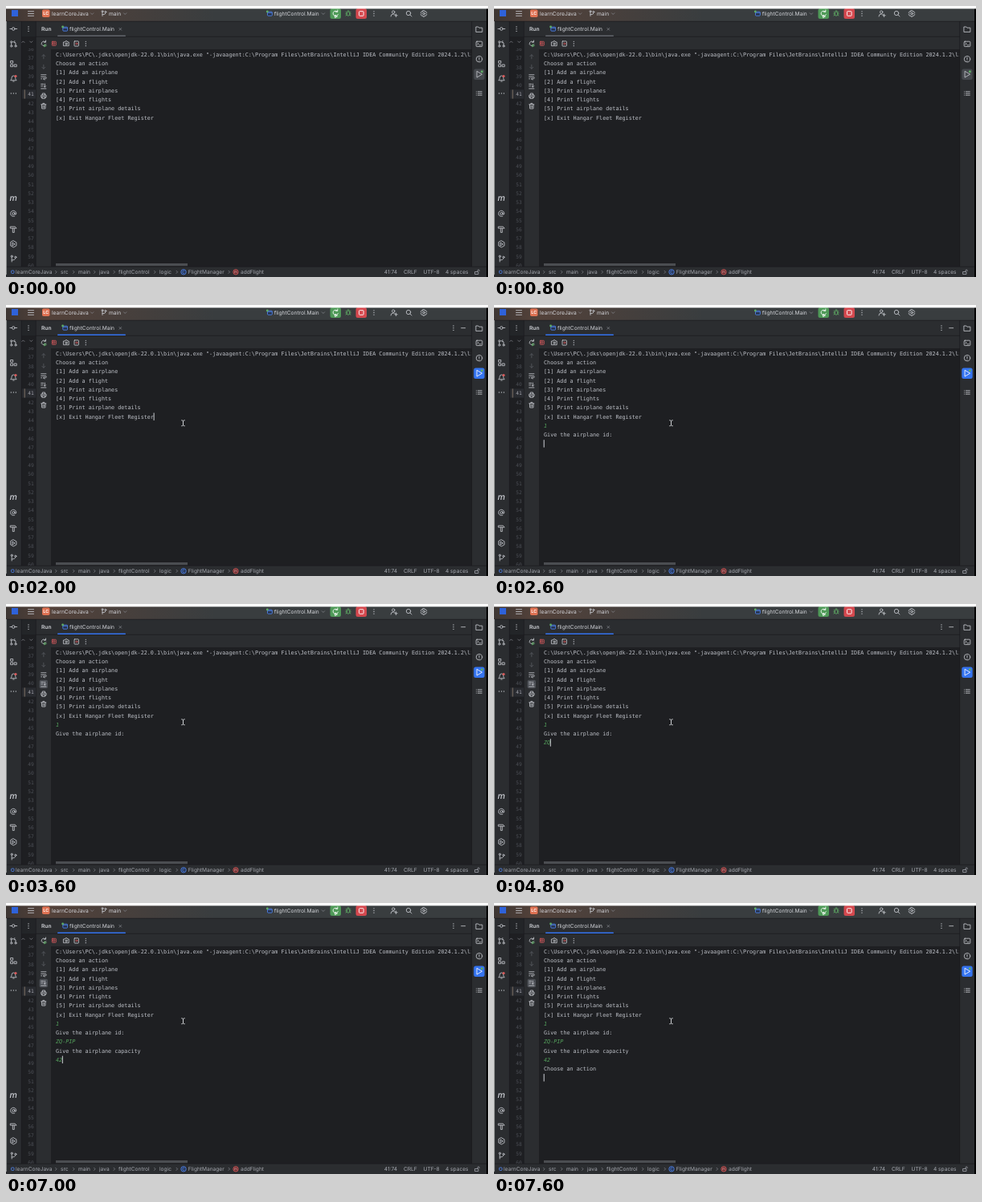
Write an HTML page that moves like this. It is 600 by 338 pixels and loops after 8 s.

```html
<!DOCTYPE html>
<html lang="en">
<head>
<meta charset="utf-8">
<title>Run console</title>
<style>
  html, body { margin: 0; width: 100%; height: 100%; overflow: hidden; background: #1e1f22; }
  svg { display: block; width: 100vw; height: 100vh; text-rendering: geometricPrecision; }
  text { white-space: pre; }
  .ui { font: 6.65px Inter, sans-serif; fill: #d3d5da; }
  .status { font-size: 6.6px; fill: #a6a9b0; }
  .mono { font: 6.75px "DejaVu Sans Mono", monospace; fill: #bec1c8; }
  .input { fill: #55a35d; font-style: italic; }
  .gutter { font-size: 6.2px; fill: #4c4f56; text-anchor: end; }
  .icon { fill: none; stroke: #c3c6cc; stroke-width: .85; stroke-linecap: round; stroke-linejoin: round; }
  .dim { stroke: #55585e; }
  .red { stroke: #d0585c; }
  .green { stroke: #5fad65; }
  .dots { stroke-width: 1.3; }
  .chevron { stroke: #8a8d94; stroke-width: .7; }
</style>
</head>
<body>
<svg viewBox="0 0 600 338" preserveAspectRatio="none">
  <defs>
    <linearGradient id="warm">
      <stop offset="0" stop-color="#3d3633"/><stop offset=".2" stop-color="#54423a"/>
      <stop offset="1" stop-color="#393d3f"/>
    </linearGradient>
    <clipPath id="view"><rect x="56" y="54" width="523" height="270"/></clipPath>
    <clipPath id="numbers"><rect x="19" y="53" width="18" height="272"/></clipPath>
  </defs>

  <!-- Panels -->
  <rect width="600" height="338" fill="#2b2d30"/>
  <rect width="600" height="19" fill="#393d3f"/>
  <rect width="260" height="19" fill="url(#warm)"/>
  <rect x="19" y="19" width="18" height="306" fill="#1e1f22"/>
  <rect x="56" y="54" width="524" height="271" fill="#1e1f22"/>
  <rect x="19" y="19" width="18" height="19" fill="#232528"/>
  <path d="M0 19.2H598M19.3 19V325M579.7 19V325M0 325.2H598M37.3 19V325M37 38.3H580" stroke="#1a1b1e" stroke-width=".7"/>
  <rect x="20" y="104.4" width="17" height="11.2" fill="#292b30"/>
  <rect x="22.6" y="104.4" width="1.3" height="11.2" fill="#6a6159"/>
  <g id="gutter" clip-path="url(#numbers)"></g>

  <!-- Header -->
  <rect x="7" y="5" width="8" height="8" fill="#2f62d9"/>
  <path class="icon" d="M27.5 6.7h7M27.5 9.5h7M27.5 12.3h7"/>
  <rect x="45" y="4.5" width="9.5" height="9.5" rx="1.8" fill="#df7152"/>
  <text x="49.8" y="11.4" text-anchor="middle" style="font:600 5.5px Inter,sans-serif;fill:#fff">LC</text>
  <g class="ui">
    <text x="57" y="11.8">learnCoreJava</text>
    <text x="128" y="11.8">main</text>
    <text x="333.8" y="11.8">flightControl.Main</text>
    <text x="44" y="31" font-weight="600">Run</text>
    <text x="79" y="31">flightControl.Main</text>
  </g>
  <path class="icon chevron" d="M105.5 8.8l1.7 1.7 1.7-1.7M146.5 8.8l1.7 1.7 1.7-1.7M393.2 8.8l1.7 1.7 1.7-1.7"/>
  <path class="icon" d="M120 7.5v5M120 10.5h2.2q1.6 0 1.6-2"/>
  <g class="icon"><circle cx="120" cy="6.7" r="1"/><circle cx="123.8" cy="7.4" r="1"/></g>
  <g id="config">
    <rect x="325.5" y="7.2" width="5.8" height="5" rx=".9" fill="#25324d" stroke="#548af7" stroke-width=".8"/>
    <path d="M325.5 8.6h5.8" stroke="#548af7" stroke-width=".7"/>
    <circle cx="325.3" cy="7" r="1.4" fill="#5fad65"/>
  </g>
  <use href="#config" x="-254.7" y="19"/>
  <rect x="403.5" y="3" width="13.5" height="13" rx="2.5" fill="#4f9a58"/>
  <path class="icon" style="stroke:#fff" d="M412.5 7a3.2 3.2 0 1 0 .8 3.6M412.8 5v2.3h-2.3M410 11.5l2.5 1.5-2.5 1.5z"/>
  <g class="icon green">
    <rect x="424.3" y="7" width="3.4" height="5.2" rx="1.7"/>
    <path d="M423 7.6l1.3.9M422.8 9.8h1.5M423 12l1.3-.9M429 7.6l-1.3.9M429.2 9.8h-1.5M429 12l-1.3-.9M424.9 6.4l.7-.7h.8l.7.7"/>
  </g>
  <rect x="435.5" y="3" width="13.5" height="13" rx="2.5" fill="#d4494f"/>
  <rect x="439.5" y="6.7" width="5.6" height="5.6" rx=".8" fill="none" stroke="#fff" stroke-width=".9"/>
  <path class="icon dots" d="M458 6.8v0M458 9.5v0M458 12.2v0"/>
  <g class="icon">
    <circle cx="482.2" cy="7.6" r="1.7"/><path d="M479 13q0-3 3.2-3 1.3 0 2 .6M485.5 10v3.5M483.8 11.8h3.5"/>
    <circle cx="501" cy="9" r="2.7"/><path d="M503 11l2 2"/>
    <circle cx="520" cy="9.5" r="1.3"/>
    <path d="M519 5.8h2l.4 1.2 1.3-.2 1 1.7-.9 1 .9 1-1 1.7-1.3-.2-.4 1.2h-2l-.4-1.2-1.3.2-1-1.7.9-1-.9-1 1-1.7 1.3.2z"/>
  </g>

  <!-- Left strip -->
  <g class="icon">
    <circle cx="9.3" cy="28.5" r="1.8"/><path d="M5 28.5h2.5M11.1 28.5h2.6"/>
    <circle cx="6.7" cy="44.8" r="1.1"/><circle cx="6.7" cy="50" r="1.1"/><circle cx="12" cy="50" r="1.1"/>
    <path d="M6.7 46v2.8M12 48.8v-2.3q0-1.7-2.2-1.7M10.8 43.5l-1.3 1.3 1.3 1.3"/>
    <rect x="6" y="68.5" width="2.7" height="2.7"/><rect x="6" y="73" width="2.7" height="2.7"/><rect x="10.5" y="73" width="2.7" height="2.7"/>
    <path d="M6 92.5q1.2-1 1.2-3.3 0-2.2 2.2-2.2t2.2 2.2q0 2.3 1.2 3.3zM8.7 94h1.4"/>
    <path class="dots" d="M6.3 109v0M9.3 109v0M12.3 109v0"/>
    <circle cx="9.3" cy="259" r="1.5"/><path d="M10.8 257.5v2.2q1.8 1.2 2-.9a3.6 3.6 0 1 0-2 3.3"/>
    <path d="M5.7 275.2h5.6l1.8 2h-7.4zM8.3 277.4v5h2v-5"/>
    <path d="M9.3 292.8l3.6 2v4.2l-3.6 2-3.6-2v-4.2zM8.2 295.2l3 1.8-3 1.8z"/>
    <circle cx="7.2" cy="312.2" r="1.1"/><circle cx="11.8" cy="313.3" r="1.1"/>
    <path d="M7.2 313.4v5.6M7.2 317q4.6 0 4.6-2.5"/>
  </g>
  <circle cx="12" cy="87.5" r="1.6" fill="#db5c5c"/>
  <text x="4.6" y="243" style="font:italic 500 10.5px Inter,sans-serif;fill:#ced0d6">m</text>

  <!-- Tool window bar and toolbars -->
  <path class="icon dots" d="M28 26v0M28 28.7v0M28 31.4v0M99.3 44.3v0M99.3 47v0M99.3 49.7v0"/>
  <path class="icon chevron" d="M19.8 45.5l1.6-1.6 1.6 1.6M29.7 44l1.6 1.6 1.6-1.6M141 27.5l2.7 2.7M143.7 27.5l-2.7 2.7"/>
  <rect id="tabLine" x="64" y="36.5" width="85" height="1.4" rx=".7"/>
  <g id="barButtons">
    <path class="icon dots" d="M557 26v0M557 28.7v0M557 31.4v0"/><path class="icon" d="M566.7 28.7h5"/>
  </g>
  <g class="icon">
    <path d="M49 44.8a2.8 2.8 0 1 0 .7 3M49.5 43v2.2h-2.2"/><path class="green" d="M48 48l2.4 1.4-2.4 1.4z"/>
    <g class="red"><rect x="57.3" y="44.3" width="5" height="5" rx=".6"/><path d="M58.8 45.8h2v2h-2z"/></g>
    <path d="M71.8 45h1.5l.7-1.2h2l.7 1.2h1.5v4.7h-6.4z"/><circle cx="75" cy="47.2" r="1.2"/>
    <rect x="85" y="43.9" width="5.4" height="6.2" rx=".6"/><path class="red" d="M86.4 47h2.6M88 45.9l1.1 1.1-1.1 1.1"/>
    <path class="dim" d="M46.8 65.8v-5M44.8 62.7l2-2 2 2M46.8 73.3v5M44.8 76.3l2 2 2-2"/>
  </g>
  <rect id="scrollToggle" x="41.5" y="94.8" width="10.5" height="10.5" rx="2" fill="#4c4f55"/>
  <g class="icon">
    <path d="M43.7 85.8h6.2M43.7 88.3h5q1.5 0 1.5 1.3t-1.5 1.3h-2M47.8 89.7l-1.2 1.2 1.2 1.2M43.7 90.8h1"/>
    <path d="M43.7 97.4h3M43.7 99.8h2M43.7 103h6.2M48.3 97v4M46.9 99.8l1.4 1.4 1.4-1.4"/>
    <path d="M45.3 111v-2h3.2v2M45 114h-1.2v-3h6.2v3h-1.2M45.2 113h3.4v2.3h-3.4z"/>
    <path d="M43.8 122.8h6M45.8 122.6v-1.2h2v1.2M44.4 123l.3 5h4.2l.3-5M46 124.6v1.8M47.6 124.6v1.8"/>
  </g>

  <!-- Right strip -->
  <rect id="runButton" x="582.3" y="78.5" width="13.4" height="13.4" rx="2.5"/>
  <g class="icon">
    <path d="M585.3 26h2.6l1 1.2h4v5.2h-7.6z"/>
    <rect x="585.2" y="44.2" width="7.6" height="6.4" rx="1"/><path d="M586.8 46l1.4 1.2-1.4 1.2M589.2 48.8h2"/>
    <circle cx="589" cy="66.2" r="3.7"/><path d="M589 64.3v2.2M589 68.1v0"/>
    <path id="runArrow" d="M586.4 81.5l6.2 3.7-6.2 3.7z"/>
    <path d="M587.3 106.8h5M587.3 109h5M587.3 111.2h5M585.4 106.8v0M585.4 109v0M585.4 111.2v0"/>
  </g>
  <circle cx="592.4" cy="81.7" r="1.5" fill="#5fad65"/>

  <!-- Console -->
  <g clip-path="url(#view)">
    <g id="console"></g>
    <rect id="caret" width="1" height="9.4" fill="#ced0d6"/>
  </g>
  <rect x="62" y="321" width="164" height="3.2" fill="#4b4d51"/>

  <!-- Status bar -->
  <g id="status"></g>
  <rect x="6.6" y="330" width="3.4" height="3.4" rx=".7" fill="none" stroke="#548af7" stroke-width=".8"/>
  <circle cx="221" cy="331.8" r="3.2" fill="#25324d" stroke="#548af7" stroke-width=".8"/>
  <circle cx="286" cy="331.8" r="3.2" fill="#5a2b2f" stroke="#db5c5c" stroke-width=".8"/>
  <path d="M222.3 330.8a1.5 1.5 0 1 0 0 2" fill="none" stroke="#548af7" stroke-width=".7"/>
  <path d="M284.5 333.2v-2.6M284.5 331.3q1.4-1.4 1.4 0v1.9M285.9 331.3q1.5-1.4 1.5 0v1.9" fill="none" stroke="#e88b8b" stroke-width=".6"/>
  <path class="icon chevron" id="crumbs"/>
  <path class="icon" style="stroke:#9da0a8" d="M584 331.5h4v3h-4zM587 331.3v-1q0-1.3 1.2-1.3t1.2 1.3"/>

  <path id="pointer" d="M-2.2-3.5q1.8 0 2.2.8.4-.8 2.2-.8M0-2.7V2.7M-2.2 3.5q1.8 0 2.2-.8.4.8 2.2.8" fill="none" stroke="#e3e5e8" stroke-width=".9"/>

  <!-- Window edges -->
  <rect x="598" width="2" height="338" fill="#000"/>
  <rect y="19" width=".8" height="316" fill="#a8a8a8"/>
  <rect width="600" height="3.4" fill="#fff"/>
</svg>
<script>
const LOOP = 8000, LEFT = 62, TOP = 60.6, PITCH = 11.23, CHAR = 4.064;
const $ = id => document.getElementById(id);

function addText(parent, x, y, className, content = '') {
  const node = document.createElementNS('http://www.w3.org/2000/svg', 'text');
  node.setAttribute('x', x);
  node.setAttribute('y', y);
  node.setAttribute('class', className);
  node.textContent = content;
  return $(parent).appendChild(node);
}

for (let n = 36; n <= 60; n++) {
  const node = addText('gutter', 34.8, 112.4 + (n - 41) * PITCH, 'mono gutter', n);
  if (n === 41) node.style.fill = '#a1a3ab';
}

const statusItems = [[12, 'learnCoreJava'], [68, 'src'], [90, 'main'], [116, 'java'], [140, 'flightControl'],
  [191, 'logic'], [226.8, 'FlightManager'], [292, 'addFlight'],
  [470.8, '41:74'], [495, 'CRLF'], [519.5, 'UTF-8'], [547, '4 spaces']];
statusItems.forEach(([x, label]) => addText('status', x, 334.3, 'ui status', label));
$('crumbs').setAttribute('d', [61.5, 83.5, 109.5, 134, 184.5, 212, 277].map(x => `M${x} 330.2l1.6 1.6-1.6 1.6`).join(''));

const menu = String.raw`C:\Users\PC\.jdks\openjdk-22.0.1\bin\java.exe "-javaagent:C:\Program Files\JetBrains\IntelliJ IDEA Community Edition 2024.1.2\lib
Choose an action
[1] Add an airplane
[2] Add a flight
[3] Print airplanes
[4] Print flights
[5] Print airplane details
[x] Exit Hangar Fleet Register`.split('\n');

// [time, row, text, is user input]
const output = [
  [2400, 8, '1', true], [2600, 9, 'Give the airplane id:'],
  [4600, 10, 'Z', true], [4800, 10, 'ZQ', true], [5000, 10, 'ZQ-', true],
  [5600, 10, 'ZQ-PI', true], [5800, 10, 'ZQ-PIP', true],
  [6200, 11, 'Give the airplane capacity'], [7000, 12, '42', true], [7600, 13, 'Choose an action'],
];

// [time, row, column]; a negative row hides the caret
const caretMoves = [
  [0, -1, 0], [1000, 7, 30], [1500, -1, 0], [2000, 7, 30], [2400, 8, 1], [2600, 10, 0], [3500, -1, 0], [4000, 10, 0],
  [4600, 10, 1], [4800, 10, 2], [5000, 10, 3], [5600, 10, 5], [5800, 10, 6],
  [6200, 12, 0], [7000, 12, 2], [7400, 13, 0], [7600, 14, 0],
];

const rows = Array.from({ length: 14 }, (_, i) =>
  addText('console', LEFT, TOP + i * PITCH + 2.4, 'mono', menu[i]));
const show = (id, visible) => $(id).setAttribute('visibility', visible ? 'visible' : 'hidden');

function draw(t) {
  const focused = t >= 1000;
  $('tabLine').setAttribute('fill', focused ? '#3574f0' : '#62666c');
  $('runButton').setAttribute('fill', focused ? '#3574f0' : '#45484d');
  $('runArrow').style.stroke = focused ? '#fff' : '#c3c6cc';
  show('barButtons', focused);
  show('pointer', focused);
  show('scrollToggle', t >= 3000);

  const k = Math.min(1, Math.max(0, (t - 1200) / 700));
  const move = 6 * k * k * (3 - 2 * k);
  $('pointer').setAttribute('transform', `translate(${214.5 + move} ${153.3 - move})`);

  rows.slice(menu.length).forEach(row => row.textContent = '');
  for (const [time, row, content, input] of output) {
    if (t < time) break;
    rows[row].textContent = content;
    rows[row].setAttribute('class', input ? 'mono input' : 'mono');
  }

  const [, row, column] = caretMoves.findLast(([time]) => t >= time);
  show('caret', row >= 0);
  $('caret').setAttribute('x', LEFT - .3 + column * CHAR);
  $('caret').setAttribute('y', TOP + row * PITCH - 4.7);
}

const start = performance.now();
function tick() {
  draw((performance.now() - start) % LOOP);
  requestAnimationFrame(tick);
}
tick();
</script>
</body>
</html>
```
